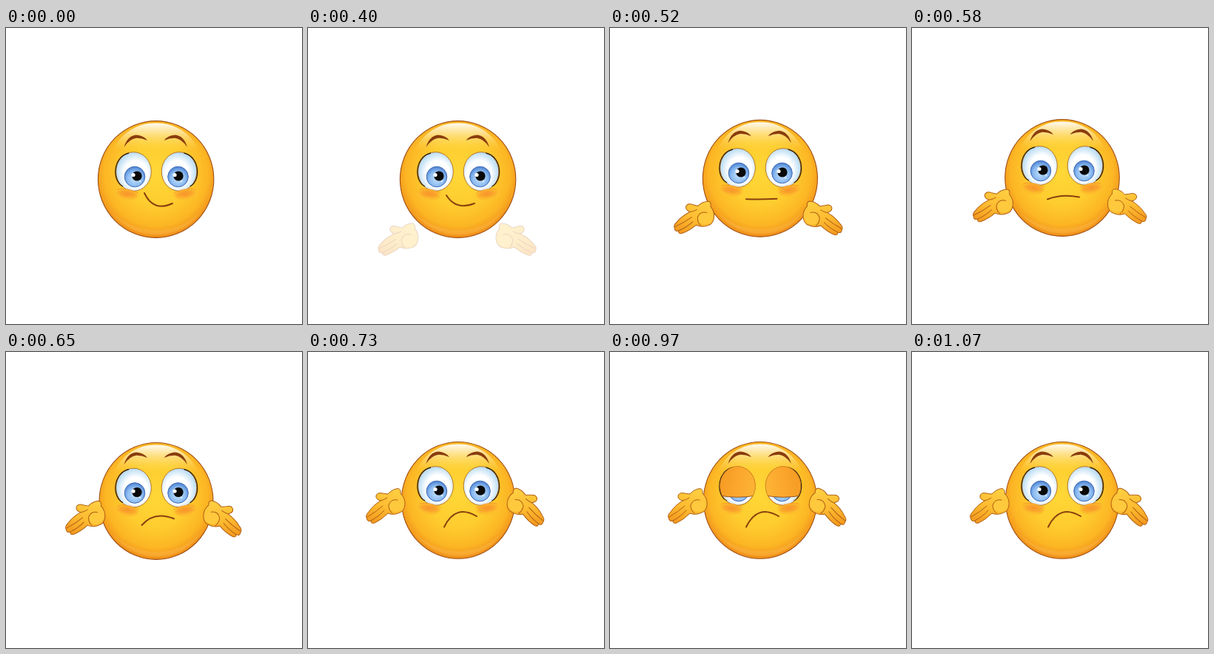
Write an HTML page that moves like this. It is 400 px wide and 400 px high and loops after 1.57 s.

```html
<!DOCTYPE html>
<html lang="en">
<head>
<meta charset="utf-8">
<title>Shrug</title>
<style>
  html, body { margin: 0; width: 100%; height: 100%; overflow: hidden; background: #fff; }
  svg { display: block; width: 100vw; height: 100vh; }
</style>
</head>
<body>
<svg viewBox="0 0 400 400">
  <defs>
    <radialGradient id="skin" cx=".5" cy=".45" r=".56">
      <stop offset="0" stop-color="#ffd737"/>
      <stop offset=".5" stop-color="#fecc2f"/>
      <stop offset=".8" stop-color="#fcb624"/>
      <stop offset="1" stop-color="#ee8a19"/>
    </radialGradient>
    <linearGradient id="gloss" x2="0" y2="1">
      <stop offset="0" stop-color="#fff" stop-opacity=".95"/>
      <stop offset=".35" stop-color="#fff3c0" stop-opacity=".6"/>
      <stop offset=".9" stop-color="#ffe04a" stop-opacity="0"/>
    </linearGradient>
    <radialGradient id="white" cx=".56" cy=".56" r=".56">
      <stop offset=".6" stop-color="#fff"/>
      <stop offset="1" stop-color="#b9dcf3"/>
    </radialGradient>
    <radialGradient id="iris" cx=".5" cy=".6" r=".6">
      <stop offset="0" stop-color="#c4e2fb"/>
      <stop offset=".6" stop-color="#8dbcf1"/>
      <stop offset="1" stop-color="#4a7fd0"/>
    </radialGradient>
    <linearGradient id="lidSkin" x1="0" x2="1" y1=".4" y2=".6">
      <stop offset="0" stop-color="#f39a22"/>
      <stop offset=".45" stop-color="#fba52c"/>
      <stop offset="1" stop-color="#fdb536"/>
    </linearGradient>
    <radialGradient id="blush">
      <stop offset="0" stop-color="#f5812a" stop-opacity=".7"/>
      <stop offset=".55" stop-color="#f88f2c" stop-opacity=".5"/>
      <stop offset="1" stop-color="#fcb92c" stop-opacity="0"/>
    </radialGradient>
    <linearGradient id="palm" x1=".7" x2=".3" y2="1">
      <stop offset="0" stop-color="#ffcf42"/>
      <stop offset=".55" stop-color="#fdbb30"/>
      <stop offset="1" stop-color="#f39a1f"/>
    </linearGradient>
    <clipPath id="socket"><ellipse cx="172.5" cy="194" rx="24" ry="26.5"/></clipPath>

    <g id="eye">
      <ellipse cx="172.5" cy="194" rx="23.8" ry="26.3" fill="url(#white)" stroke="#a85e14" stroke-width=".8"/>
      <path d="M166 169C144 174 143 207 158 214" fill="none" stroke="#3a2410" stroke-width="1.3"/>
      <circle cx="174" cy="201" r="13.8" fill="url(#iris)" stroke="#3f6cb5" stroke-width="1"/>
    </g>
    <g id="pupil">
      <circle r="6.6" fill="#090909"/>
      <circle cx="-5" cy="-1.5" r="2.6" fill="#fff"/>
      <circle cx="4" cy="7" r="1.6" fill="#d9eeff" opacity=".8"/>
    </g>
    <g id="lid" clip-path="url(#socket)">
      <path class="lid" fill="url(#lidSkin)" stroke="#9a5413" stroke-width="1"/>
      <ellipse cx="172.5" cy="194" rx="24" ry="26.5" fill="none" stroke="#cf7a1b" stroke-width="1.2"/>
    </g>
    <path id="lash" d="M165 216Q177 226 189 215Q178 218 165 216Z" fill="#1c1008"/>
    <g id="cheek" transform="rotate(8 164 224)">
      <ellipse cx="162" cy="225.5" rx="16" ry="7.5" fill="#fdbf2c"/>
      <ellipse cx="164" cy="224" rx="18" ry="7.5" fill="url(#blush)"/>
      <path d="M150 220Q162 215 179 221" fill="none" stroke="#f4912a" stroke-width="1" opacity=".7"/>
    </g>
    <path id="brow" d="M159.5 161Q164 145.5 176 144.5Q186 145 191 152Q183 148.5 176 148.8Q167 150 159.5 161Z" fill="#8a3c0d"/>
    <g id="hand" stroke="#b06015" stroke-width="1" stroke-linecap="round" stroke-linejoin="round">
      <path fill="url(#palm)" d="M98 201Q91 199 92 194Q94 189 101 191L108 192Q114 185 122 184.5Q126 186 125 191
        Q132 198 131 207Q130 215 124 217Q116 221 108 218Q99 227 90 231Q85 232.5 85 228Q80 230 79.5 225
        Q77 221 82 216Q87 208 98 201Z"/>
      <path fill="#ffc93d" stroke="none" d="M110 207Q113 199 121 200Q130 202 129 209Q126 216 118 216Q110 215 110 207Z"/>
      <path fill="none" d="M85 228Q96 222 103 214M80 223Q92 216 101 208M98 201Q103 200 107 197
        M121 200Q112 198 109 207Q109 214 114 218"/>
    </g>
  </defs>

  <g id="body">
    <ellipse rx="78.2" ry="78.9" fill="url(#skin)" stroke="#a04f14" stroke-width="1.1"/>
    <path d="M-60 44Q-36 75 2 75Q42 74 62 40Q42 67 2 69Q-36 68 -60 44Z" fill="#ffc45a" opacity=".3"/>
    <path d="M-61 -34C-48 -64 -25 -76 0 -76S48 -64 61 -34Z" fill="url(#gloss)"/>
  </g>
  <g id="eyes">
    <use href="#eye"/><use href="#eye" transform="matrix(-1 0 0 1 406.5 0)"/>
    <use href="#pupil" x="177" y="200"/><use href="#pupil" x="233" y="200"/>
    <g id="lids"><use href="#lid"/><use href="#lid" transform="matrix(-1 0 0 1 406.5 0)"/></g>
    <use href="#cheek"/><use href="#cheek" transform="matrix(-1 0 0 1 406 0)"/>
    <g id="lashes"><use href="#lash"/><use href="#lash" transform="matrix(-1 0 0 1 406.5 0)"/></g>
  </g>
  <g id="brows"><use href="#brow"/><use href="#brow" transform="matrix(-1 0 0 1 404.5 0)"/></g>
  <path id="mouth" fill="none" stroke="#8a400e" stroke-width="2" stroke-linecap="round"/>
  <g id="hands">
    <use id="left" href="#hand"/>
    <g id="mirror"><use id="right" href="#hand"/></g>
  </g>
</svg>
<script>
const $ = id => document.getElementById(id);
const set = (id, name, value) => $(id).setAttribute(name, value);
const lidPath = document.querySelector('.lid');

// Values at each key step; steps between are interpolated.
const keys = [0, 1, 3, 7, 11];
const tracks = {
  mouth: [
    [187, 223, 199, 249, 225, 237],
    [187, 226, 200, 247, 225, 237],
    [185, 231, 203, 240, 225, 233],
    [183, 231.5, 202, 224, 226, 228.5],
    [184, 236.5, 199, 205, 228, 222]
  ],
  // centre x, centre y, width factor
  body: [[202.6, 204.5, 1], [202.6, 204.5, 1], [202.8, 204, .995], [203, 202.5, .988], [203, 200.4, .98]],
  // eyes, brows
  lift: [[0, 0], [0, 0], [-2, -3.5], [-8, -8], [-13, -10]],
  // palm x, palm y, left turn, right turn, mirror width
  hand: [
    [135, 282, 6, 6, 403], [135, 282, 6, 6, 403], [131, 268.5, 6, 4, 402.5],
    [122.5, 236, 5, 0, 401], [117, 203, 0, -8, 400.5]
  ]
};

function stepAt(t) {
  if (t < 400) return 0;
  if (t < 610) return 1 + Math.floor((t - 400) / 30);
  if (t < 930) return 8 + Math.floor((t - 610) / 40);
  return Math.min(19, 16 + Math.floor((t - 930) / 46.6));
}

function pose(name, step) {
  const s = Math.min(step, 11);
  const i = Math.min(3, keys.findLastIndex(k => k <= s));
  const f = (s - keys[i]) / (keys[i + 1] - keys[i]);
  const [a, b] = tracks[name].slice(i, i + 2);
  return a.map((v, j) => v + (b[j] - v) * f);
}

function draw(now) {
  const step = stepAt(now % 1570);

  const [cx, cy, sx] = pose('body', step);
  set('body', 'transform', `translate(${cx} ${cy}) scale(${sx} 1)`);

  const [eyeLift, browLift] = pose('lift', step);
  set('eyes', 'transform', `translate(0 ${eyeLift})`);
  set('brows', 'transform', `translate(0 ${browLift})`);

  const m = pose('mouth', step);
  set('mouth', 'd', `M${m[0]} ${m[1]}Q${m.slice(2).join(' ')}`);

  const shut = Math.max(0, 1 - Math.abs(step - 15) / 4);
  const edge = 167 + 53 * shut;
  lidPath.setAttribute('d', `M147 165H198V${edge}Q172 ${edge + 5} 147 ${edge}Z`);
  set('lids', 'visibility', shut ? 'visible' : 'hidden');
  set('lashes', 'visibility', shut === 1 ? 'visible' : 'hidden');

  const [hx, hy, leftTurn, rightTurn, width] = pose('hand', step);
  const place = turn => `translate(${hx - 117} ${hy - 203}) rotate(${turn} 117 203)`;
  set('left', 'transform', place(leftTurn));
  set('right', 'transform', place(rightTurn));
  set('mirror', 'transform', `matrix(-1 0 0 1 ${width} 0)`);
  set('hands', 'opacity', [0, .25, .65][step] ?? 1);

  requestAnimationFrame(draw);
}
draw(performance.now());
</script>
</body>
</html>
```
